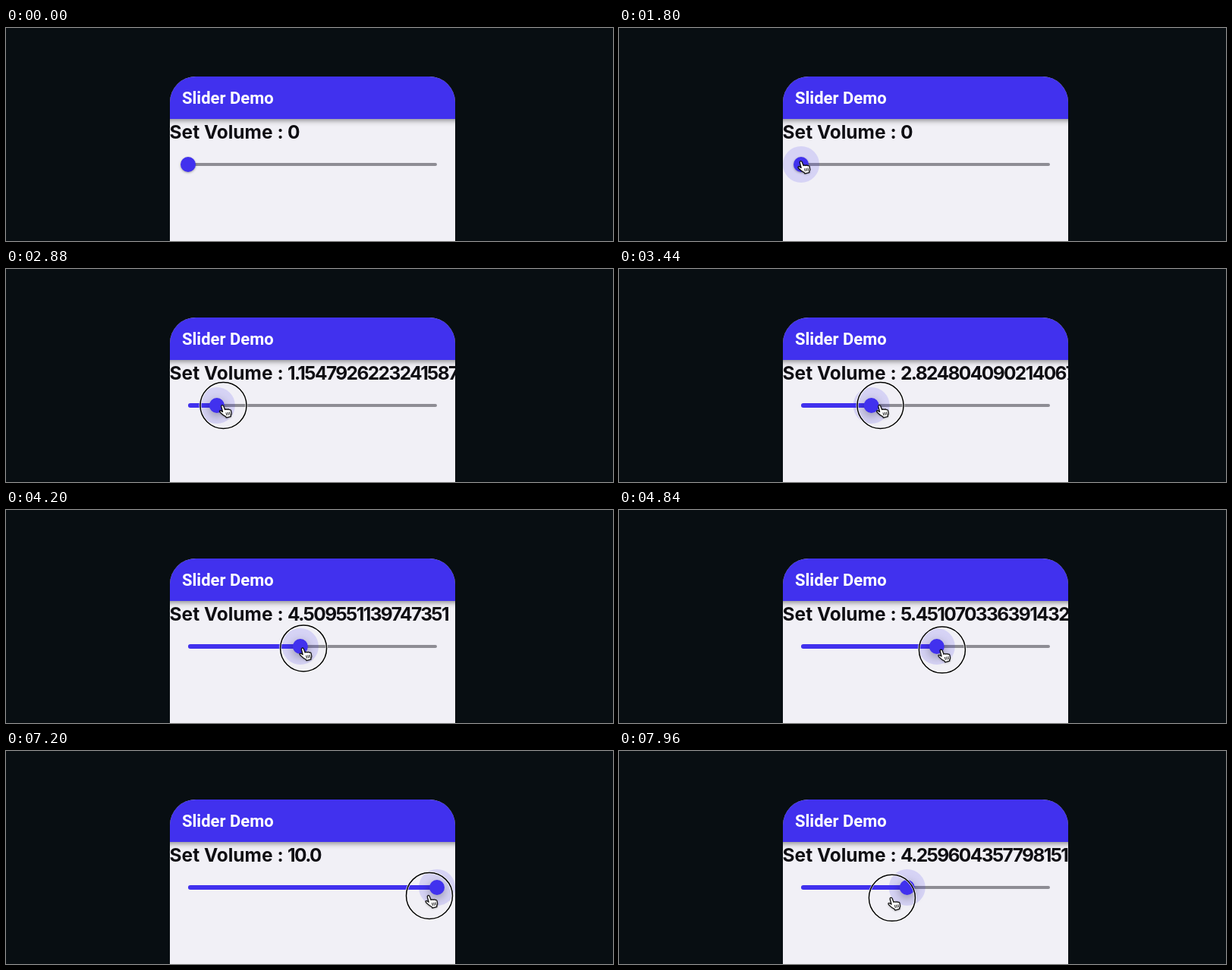
An HTML page with a canvas that plays this animation: 800x281 px, repeating every 8000 ms.

```html
<!DOCTYPE html>
<html lang="en">
<head>
<meta charset="utf-8">
<title>Slider Demo</title>
<style>
  html, body { margin: 0; width: 100%; height: 100%; overflow: hidden; background: #080e12; }
  canvas { display: block; width: 800px; height: 281px; }
</style>
</head>
<body>
<canvas id="stage"></canvas>
<script>
const W = 800, H = 281, LOOP = 8000, STEP = 40;
const PURPLE = '#4131ee', INK = '#0f0e13';
const PHONE = { x: 216, y: 64, w: 376, r: 34 };
const TRACK = { x: 240, y: 180, w: 328 };
const ENTER = 940, HOVER = 1640, PRESS = 2080;
const LAG = 80; // the thumb trails the pointer by this many ms

const canvas = document.getElementById('stage');
const ctx = canvas.getContext('2d');
const dpr = window.devicePixelRatio || 1;
canvas.width = W * dpr;
canvas.height = H * dpr;

// Drag positions in slider units as [time, value]; past 10 the thumb stops
const dragKeys = [
  [2480, 0], [2880, 1.1547926223241587], [3440, 2.824804090214067],
  [3650, 3.65], [4840, 5.451070336391432], [5920, 9.135846712538223],
  [6440, 10.4], [7040, 10.4], [7960, 4.259604357798151], [8120, 3.25]
];

const ramp = (t, from, to) => Math.min(1, Math.max(0, (t - from) / (to - from)));
const ease = u => u * u * (3 - 2 * u);

// Monotone cubic curve through the drag positions
function dragAt(t) {
  const k = dragKeys, last = k.length - 1;
  if (t <= k[0][0]) return k[0][1];
  if (t >= k[last][0]) return k[last][1];
  const slope = i => (k[i + 1][1] - k[i][1]) / (k[i + 1][0] - k[i][0]);
  const tangent = i => {
    if (i === 0 || i === last) return 0;
    const a = slope(i - 1), b = slope(i);
    return a * b > 0 ? 2 * a * b / (a + b) : 0;
  };
  let i = 0;
  while (t >= k[i + 1][0]) i++;
  const span = k[i + 1][0] - k[i][0];
  const u = (t - k[i][0]) / span;
  return k[i][1] + (k[i + 1][1] - k[i][1]) * ease(u)
    + span * u * (1 - u) * (tangent(i) * (1 - u) - tangent(i + 1) * u);
}

const volumeAt = t => Math.min(10, dragAt(t));
const trackX = value => TRACK.x + TRACK.w * value / 10;

function pointerAt(t) {
  const away = 1 - ease(ramp(t, ENTER, 1760));
  return {
    x: trackX(dragAt(t + LAG)) + 1 + 65 * away,
    y: 176 + 120 * away + 4 * ramp(t, 1800, PRESS)
      + 10 * ramp(t, 3500, 6400) + 4 * ramp(t, 6960, LOOP)
  };
}

function disc(x, y, r, fill) {
  ctx.beginPath();
  ctx.arc(x, y, r, 0, Math.PI * 2);
  ctx.fillStyle = fill;
  ctx.fill();
}

function bar(x1, x2, height, fill) {
  ctx.beginPath();
  ctx.roundRect(x1, TRACK.y - height / 2, x2 - x1, height, height / 2);
  ctx.fillStyle = fill;
  ctx.fill();
}

function text(str, x, y, font, fill, tracking = 0) {
  ctx.font = font;
  ctx.letterSpacing = tracking + 'px';
  ctx.fillStyle = fill;
  ctx.fillText(str, x, y);
}

function shadow(color, blur, dy) {
  ctx.shadowColor = color;
  ctx.shadowBlur = blur * dpr;
  ctx.shadowOffsetY = dy * dpr;
}

function formatVolume(v) {
  if (v <= 0) return '0';
  return v >= 10 ? '10.0' : String(v);
}

function drawScreen(volume) {
  ctx.beginPath();
  ctx.roundRect(PHONE.x, PHONE.y, PHONE.w, H, PHONE.r);
  ctx.clip();
  ctx.fillStyle = '#f1f0f6';
  ctx.fillRect(PHONE.x, PHONE.y, PHONE.w, H);

  ctx.save();
  shadow('rgba(0,0,0,0.45)', 7, 2);
  ctx.fillStyle = PURPLE;
  ctx.fillRect(PHONE.x - 10, PHONE.y, PHONE.w + 20, 56);
  ctx.restore();

  text('Slider Demo', 232, 100, '700 22px Roboto, sans-serif', '#fff');
  const font = '700 24.5px Inter, sans-serif';
  text('Set Volume :', 215.5, 146, font, INK);
  text(formatVolume(volume), 371, 146, font, INK, -1.6);
}

function drawSlider(t, volume) {
  const x = trackX(volume);
  bar(TRACK.x, TRACK.x + TRACK.w, 4, '#8e8d94');
  if (volume > 0) bar(TRACK.x, x, 6, PURPLE);

  const grow = ramp(t, HOVER, HOVER + 120);
  if (grow > 0) disc(x, TRACK.y, 24 * grow, 'rgba(64,48,237,0.15)');

  ctx.save();
  if (t >= PRESS) shadow('rgba(0,0,0,0.35)', 13, 4);
  else shadow('rgba(0,0,0,0.35)', 3, 1);
  disc(x, TRACK.y, 10, PURPLE);
  ctx.restore();
}

const hand = new Path2D('M-2 1.4C-2.2-.6.2-1.1.9.7L2.8 5.6Q4.2 4.4 5.6 5.5Q7.2 4.4 8.4 5.7' +
  'Q10.4 5.2 10.8 7L11.4 10.6Q11.4 12.4 10.4 13.4L10.6 14.6L4.6 16.2L4 14.8' +
  'Q.2 13-2.6 10Q-5 7.8-4 6.9Q-2.6 6.2-.2 8.4Z');
const creases = new Path2D('M4.2 9.4l1 3.8M6.4 9l.9 3.8M8.6 8.6l.8 3.8');

function strokeWith(color, width, path) {
  ctx.strokeStyle = color;
  ctx.lineWidth = width;
  if (path) ctx.stroke(path);
  else ctx.stroke();
}

function drawPointer(t) {
  if (t < ENTER) return;
  const { x, y } = pointerAt(t);
  if (t >= PRESS) {
    ctx.beginPath();
    ctx.arc(x, y, 30.5, 0, Math.PI * 2);
    strokeWith('rgba(255,255,255,0.85)', 3);
    strokeWith('#000', 1.5);
  }
  ctx.save();
  ctx.translate(x - 0.7, y);
  ctx.lineJoin = 'round';
  ctx.save();
  shadow('rgba(0,0,0,0.35)', 3, 1);
  ctx.fillStyle = '#fff';
  ctx.fill(hand);
  ctx.restore();
  strokeWith('#111', 1.3, hand);
  strokeWith('#111', 1, creases);
  ctx.restore();
}

function draw(now) {
  const t = Math.floor(((now + 1) % LOOP) / STEP) * STEP;
  const volume = volumeAt(t);
  ctx.setTransform(dpr, 0, 0, dpr, 0, 0);
  ctx.fillStyle = '#080e12';
  ctx.fillRect(0, 0, W, H);
  ctx.save();
  drawScreen(volume);
  drawSlider(t, volume);
  ctx.restore();
  drawPointer(t);
}

function tick() {
  draw(performance.now());
  requestAnimationFrame(tick);
}
tick();
</script>
</body>
</html>
```
